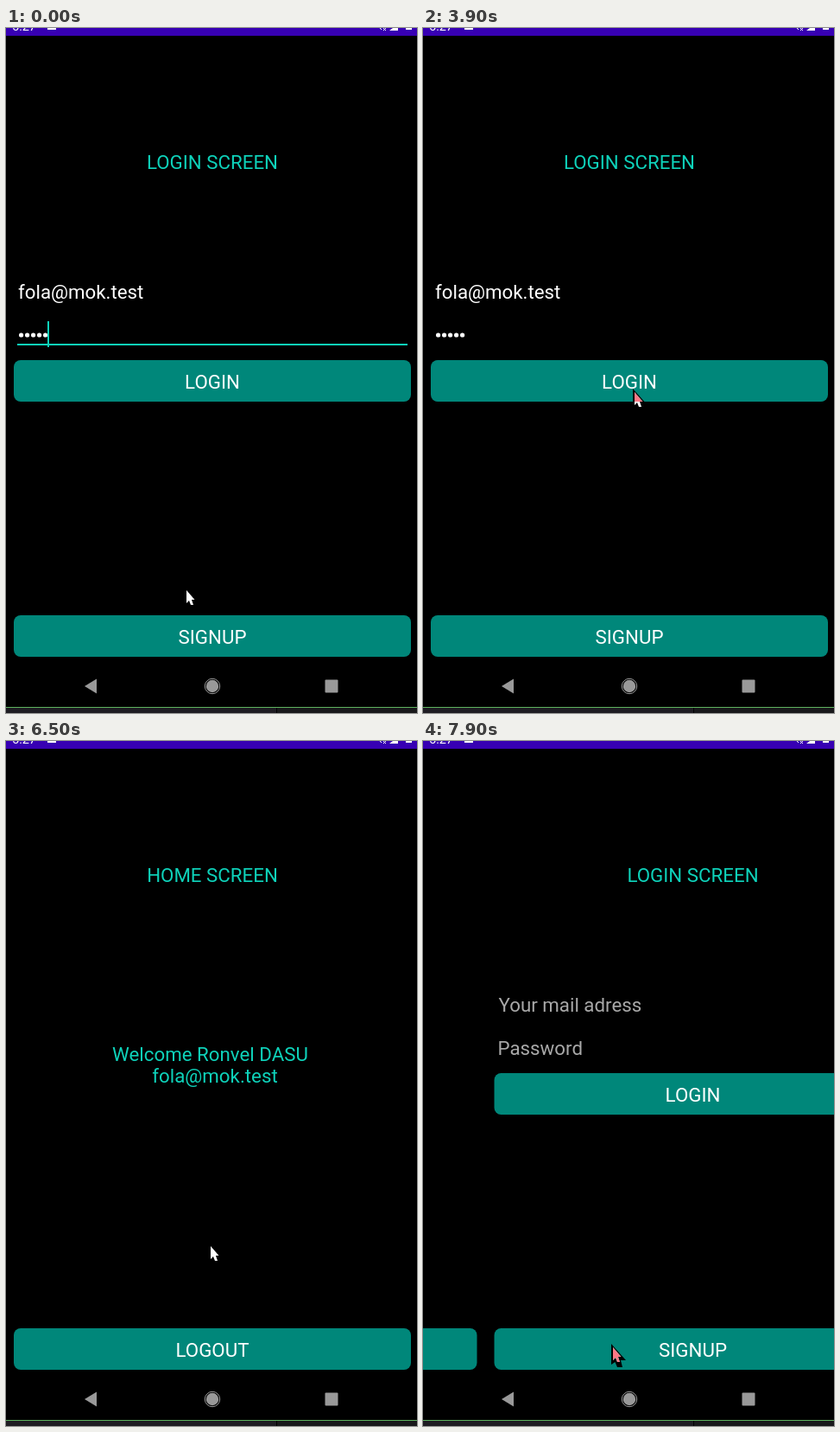
An HTML page that plays this animation: 476 by 792 pixels, repeating every 8000 ms.

```html
<!DOCTYPE html>
<html lang="en">
<head>
<meta charset="utf-8">
<title>Login flow</title>
<style>
  html, body { margin: 0; width: 100%; height: 100%; overflow: hidden; background: #000; }
  svg { display: block; width: 476px; height: 792px; isolation: isolate; }
  text { font: 22.3px Roboto, "Noto Sans", sans-serif; fill: #fff; }
  .mid { text-anchor: middle; }
  .teal { fill: #0ed2ba; }
  .hint { fill: #a8a8a8; }
  .button { fill: #00877a; }
  .nav { fill: #999; }
  #fill { fill: #fff; mix-blend-mode: difference; }
</style>
</head>
<body>
<svg viewBox="0 0 476 792">
  <defs>
    <rect id="button" class="button" x="9" width="460" height="48" rx="8"/>
  </defs>
  <rect width="476" height="792"/>

  <g id="login">
    <text class="mid teal" x="239" y="163">LOGIN SCREEN</text>
    <g id="filled">
      <text x="14" y="313">fola@mok.test</text>
      <g id="dots" fill="#fff"></g>
    </g>
    <g id="hints">
      <text class="hint" x="14" y="313">Your mail adress</text>
      <text class="hint" x="13" y="363">Password</text>
    </g>
    <rect id="underline" class="teal" x="13" y="365" width="452" height="2"/>
    <rect id="caret" class="teal" x="48" y="339" width="2" height="30"/>
    <use href="#button" y="384"/>
    <text class="mid" x="239" y="417">LOGIN</text>
    <use href="#button" y="679"/>
    <text class="mid" x="239" y="712">SIGNUP</text>
  </g>

  <g id="home">
    <text class="mid teal" x="239" y="163">HOME SCREEN</text>
    <text class="mid teal" x="236.5" y="370">Welcome Ronvel DASU</text>
    <text class="mid teal" x="242" y="395">fola@mok.test</text>
    <use href="#button" y="679"/>
    <text class="mid" x="239" y="712">LOGOUT</text>
  </g>

  <!-- status bar -->
  <rect width="476" height="9" fill="#3700b3"/>
  <text x="7" y="3" style="font-size:14.5px">5:27</text>
  <path fill="#fff" d="M48 0h10v2h-10zM444 3l4-3h6v3zM463 0h7v2h-7z"/>
  <path stroke="#fff" d="M433 0l2 2M437 0l3 3M440 0l-3 3"/>

  <!-- navigation bar -->
  <path class="nav" d="M91 761L105 752.5V769.5Z"/>
  <circle class="nav" cx="239" cy="761" r="7.2"/>
  <circle cx="239" cy="761" r="8.7" fill="none" stroke="#999"/>
  <rect class="nav" x="369.5" y="753.5" width="15" height="15" rx="1"/>
  <rect y="786" width="313" height="6" fill="#1e1c22"/>
  <rect x="314" y="786" width="162" height="6" fill="#18181a"/>
  <rect y="785" width="476" height="1" fill="#5fb35f"/>

  <path id="outline" fill-rule="evenodd"
    d="M-2-4V20L2.5 17L5 23H11L9 15H15ZM0 0V15L3 12L5 17H8L6 11H9.5Z"/>
  <path id="fill" d="M0 0V15L3 12L5 17H8L6 11H9.5Z"/>
</svg>
<script>
const LOOP = 8000, STEP = 100, PAGE = 480;
const LOGIN_AT = 3900, LOGOUT_AT = 7528, SLIDE = 500, BLUR_AT = 3800;
const $ = id => document.getElementById(id);

// [time, x, y] of the pointer tip
const route = [
  [0, 209, 650], [300, 219, 604], [400, 219, 604], [800, 238, 505],
  [900, 238, 505], [1300, 245, 421], [6400, 245, 421], [6500, 237, 584],
  [6700, 216, 682], [6800, 214, 699], [7000, 220, 701], [LOOP, 220, 701]
];

$("dots").innerHTML = [0, 1, 2, 3, 4]
  .map(i => `<circle cx="${17.6 + i * 7}" cy="355" r="2.6"/>`).join("");

function slide(t, start) {
  const p = Math.min(1, Math.max(0, (t - start) / SLIDE));
  return (1 - Math.cos(p * Math.PI)) / 2;
}

function pointer(t) {
  const i = route.findIndex(k => k[0] > t);
  const [t0, x0, y0] = route[i - 1], [t1, x1, y1] = route[i];
  const p = (t - t0) / (t1 - t0);
  return [x0 + (x1 - x0) * p, y0 + (y1 - y0) * p].map(Math.round);
}

function move(id, x, y = 0) {
  $(id).setAttribute("transform", `translate(${x} ${y})`);
}

function show(id, visible) {
  $(id).style.display = visible ? "" : "none";
}

function draw(t) {
  const enter = slide(t, LOGIN_AT), leave = slide(t, LOGOUT_AT);
  const returning = t >= LOGOUT_AT;
  move("login", PAGE * (returning ? 1 - leave : -enter));
  move("home", PAGE * (1 - enter - leave));
  show("filled", !returning);
  show("hints", returning);
  show("underline", t < BLUR_AT);
  show("caret", t < 3700 && (t + 200) % 1000 < 500);
  const [x, y] = pointer(t);
  move("outline", x, y);
  move("fill", x, y);
}

const start = performance.now();
function tick() {
  const t = (performance.now() - start) % LOOP;
  draw(Math.floor(t / STEP) * STEP);
  requestAnimationFrame(tick);
}
tick();
</script>
</body>
</html>
```
